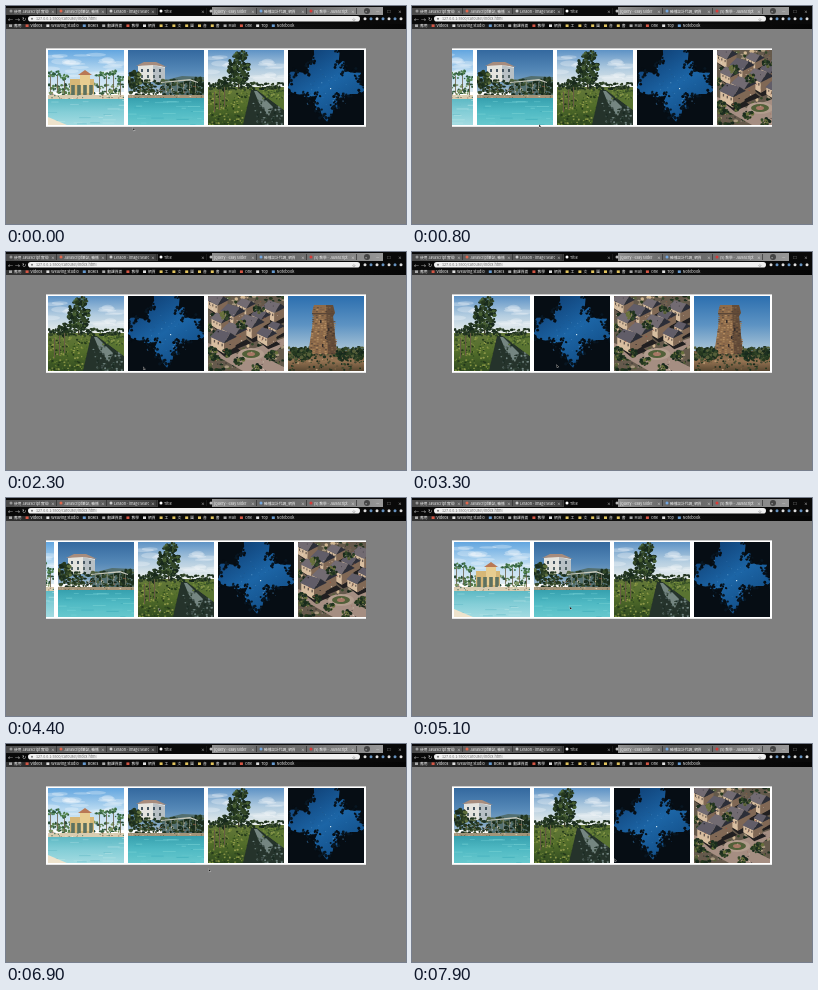
These frames come from a looping animation (400 px wide and 218 px high, 8000 ms). An HTML page with a canvas:

```html
<!DOCTYPE html>
<html lang="zh">
<head>
<meta charset="utf-8">
<style>
html, body { margin: 0; width: 100%; height: 100%; overflow: hidden; background: #808080 }
canvas { display: block; width: 400px; height: 218px }
</style>
</head>
<body>
<canvas id="stage" width="400" height="218"></canvas>
<script>
const W = 76, H = 75, SLOT = 80, LOOP = 8000;
const stage = document.getElementById('stage').getContext('2d');
let g, seed;

const rnd = (a = 0, b = 1) => {
  seed = (seed * 16807) % 2147483647;
  return a + (b - a) * seed / 2147483647;
};
const pick = list => list[Math.floor(rnd(0, list.length))];

function layer(w, h, draw) {
  const c = document.createElement('canvas');
  c.width = w;
  c.height = h;
  g = c.getContext('2d');
  seed = 4711;
  draw();
  return c;
}
function rect(color, x, y, w, h) {
  g.fillStyle = color;
  g.fillRect(x, y, w, h);
}
function poly(color, ...p) {
  g.fillStyle = color;
  g.beginPath();
  for (let i = 0; i < p.length; i += 2) g.lineTo(p[i], p[i + 1]);
  g.fill();
}
function oval(color, x, y, rx, ry = rx) {
  g.fillStyle = color;
  g.beginPath();
  g.ellipse(x, y, rx, ry, 0, 0, 7);
  g.fill();
}
function gradient(x, y, dx, dy, ...colors) {
  const f = g.createLinearGradient(x, y, x + dx, y + dy);
  colors.forEach((c, i) => f.addColorStop(i / (colors.length - 1), c));
  return f;
}
const fade = (y, h, ...colors) => rect(gradient(0, y, 0, h, ...colors), 0, y, W, h);

// Scatter small flecks over a box.
function flecks(n, x, y, w, h, size, ...colors) {
  while (n--) oval(pick(colors), x + rnd(0, w), y + rnd(0, h), rnd(.4, 1) * size, rnd(.3, .8) * size);
}
// Scatter leaves inside an ellipse.
function crown(n, x, y, rx, ry, size, ...colors) {
  while (n--) {
    const a = rnd(0, 6.3), r = Math.sqrt(rnd());
    oval(pick(colors), x + rx * r * Math.cos(a), y + ry * r * Math.sin(a), rnd(.5, 1) * size);
  }
}
function clouds(n, y, h) {
  while (n--) oval('rgba(255,255,255,.28)', rnd(0, W), y + rnd(0, h), rnd(4, 12), rnd(1, 3));
}
function ripples(y, ...colors) {
  for (let i = 0; i < 28; i++) rect(pick(colors), rnd(-5, W), rnd(y, H), rnd(3, 14), .6);
}
const DARK = ['#18291c', '#25381f', '#34482a', '#1d3020'];

function city() {
  fade(0, 38, '#3d74aa', '#7d9fbd', '#d6b8a2');
  fade(36, 39, '#66544d', '#4b342d', '#2b2323');
  flecks(60, 0, 33, W, 5, 1.6, '#40444d', '#665755', '#b3907c');
  for (let y = 37; y < 73; y += .5) {
    const s = y / 20;
    rect(pick(['#75483a', '#94664f', '#382c2e', '#54423d', '#24232a', '#b18665']), rnd(-2, W), y, rnd(1, 3) * s, rnd(.5, 1.4) * s);
  }
  poly('#cbc4bb', 17, 37, 18.7, 25, 20, 37);
  poly('#72473a', 25, H, 29, 53, 48, 51, 52, H);
  flecks(35, 27, 54, 40, 18, .8, '#e0a56d', '#241f24', '#a06c4f');
}
function pool() {
  fade(0, 42, '#62a5df', '#b7d9f1', '#e0edf4');
  clouds(25, 4, 22);
  flecks(120, 0, 34, W, 11, 2, '#355c3d', '#567d4b', '#7d9563', '#294c39');
  rect('#d7b777', 22, 29, 24, 18);
  rect('#e8cd91', 32, 24, 10, 19);
  poly('#b97855', 30, 25, 37, 20, 44, 25);
  for (let x = 25; x < 46; x += 6) rect('#5d7160', x - 1.8, 35, 3.6, 10);
  for (let x = 2; x < W; x += 7) {
    if (x > 20 && x < 48) continue;
    const y = rnd(23, 29);
    rect('#6a6048', x, y, .8, 18);
    crown(14, x, y, 4.5, 3, 1.3, '#3f7045', '#588a50', '#2e5940');
  }
  rect('#d9ccb0', 0, 45, W, 5);
  flecks(35, 0, 44, W, 5, 1.1, '#f2e7d2', '#967e65', '#557a65');
  fade(49, 26, '#5eb9c4', '#84ced7', '#a3dbe1');
  ripples(50, '#b3e2e5', '#69bdc9', '#96d5dc');
  poly('#eee3cc', 0, 67, 19, H, 0, H);
}
function house() {
  fade(0, 42, '#34699f', '#5588b7', '#94b3ca');
  poly('#536f70', 34, 31, 54, 26, W, 27, W, 45, 34, 45);
  poly('#e4e4df', 10, 32, 10, 16, 22, 13, 37, 17, 37, 32);
  poly('#b8c0c5', 25, 15, 37, 18, 37, 32, 25, 32);
  poly('#a78c7d', 8, 16, 16, 12, 28, 12, 39, 17, 25, 15);
  for (let x = 13; x < 36; x += 6) {
    rect('#465662', x, 19, 2, 3);
    rect('#536365', x, 25, 2, 3);
  }
  flecks(190, 0, 30, W, 15, 2.1, ...DARK, '#526340');
  crown(55, 6, 31, 8, 10, 2, ...DARK, '#5d6e3c');
  crown(50, 69, 36, 9, 9, 2, ...DARK);
  poly('#c7c9bd', 33, 32, 62, 29, 70, 32, 70, 33, 62, 30.5, 33, 33);
  for (let x = 37; x < 70; x += 6) rect('#8b907f', x, 32, .6, 11);
  flecks(28, 8, 35, 60, 8, .8, '#e5c9a5', '#a96b51', '#d5dad1');
  rect('#a39479', 0, 45, W, 3);
  flecks(30, 0, 44, W, 4, .8, '#e3d4b7', '#515d44');
  fade(48, 27, '#36a0ae', '#50bac4', '#67c8cd');
  ripples(49, '#75d0d4', '#3eacba', '#62c4cc');
}
function river() {
  fade(0, 38, '#5d92c5', '#b2cce0', '#edf0ec');
  clouds(20, 5, 25);
  fade(37, 38, '#64783a', '#526d2a', '#304a20');
  flecks(130, 0, 33, W, 7, 2, ...DARK);
  flecks(190, 0, 40, 43, 35, 1.4, '#778b39', '#4e6927', '#304b20', '#8e9949', '#24391b');
  poly('#25332b', 43, 40, 49, 40, W, 60, W, H, 35, H);
  poly('#758681', 46, 41, 49, 41, 65, 57, 61, 66, 51, 53);
  flecks(75, 45, 49, 29, 26, 1.5, '#42524d', '#1b2c24', '#718480', '#2e4034');
  poly('#597331', 49, 40, W, 40, W, 60);
  flecks(75, 55, 40, 21, 9, 1.2, '#70883b', '#344d27', '#8a994d');
  rect('#40402b', 30, 25, 1.4, 14);
  crown(190, 31, 19, 11, 15, 1.9, ...DARK, '#465e32');
  crown(45, 33, 5, 7, 5, 1.5, ...DARK, '#496239');
  crown(40, 17, 32, 7, 5, 1.7, ...DARK);
  for (let x = 6; x < 18; x += 5) rect('#675d43', x, 45 - x / 2, 1.1, 20);
}
function night() {
  rect('#060d14', 0, 0, W, H);
  // The sky is a four-armed gap with a ragged edge of treetops.
  const edge = [];
  for (let a = 0; a < 6.28; a += .07) {
    const r = 29 + 9 * Math.cos(4 * a) - 5 * Math.sin(a) + 3 * Math.sin(13 * a) + rnd(-3, 3);
    edge.push(38 + r * Math.cos(a), 35 + r * Math.sin(a));
  }
  poly(gradient(10, 0, 50, H, '#0e3c70', '#1c65a6', '#10477d'), ...edge);
  for (let i = 0; i < edge.length; i += 6) crown(7, edge[i], edge[i + 1], 4, 4, 1.6, '#060d14', '#081622');
  flecks(45, 18, 15, 42, 40, .7, '#3d82bb', '#5d99cb', '#1e588d');
  rect('#c4dfef', 42, 38, 1.2, 1.2);
}
function building(x, y, s) {
  g.save();
  g.translate(x, y);
  g.scale(s, s);
  poly('#211f20', -9, 6, 1, 12, 10, 7, 14, 10, 2, 15);
  poly('#d8bea0', -9, -1, 1, 4, 1, 12, -9, 6);
  poly('#806855', 1, 4, 10, -1, 10, 7, 1, 12);
  poly(pick(['#615d68', '#726b72', '#4d4b54']), -10, -1, -4, -7, 6, -4, 1, 4);
  poly('#2c2e38', 1, 4, 6, -4, 11, -1);
  for (let i = -7; i < 0; i += 3) rect('#5e5149', i, 5 + i / 2, 1, 2);
  g.restore();
}
function village() {
  rect('#655a4c', 0, 0, W, H);
  flecks(280, 0, 0, W, H, 2.6, ...DARK, '#59613a', '#a7977d', '#716252', '#d0b691');
  poly('#a58e82', 0, 47, 30, 58, W, 42, W, 49, 58, 62, W, 71, W, H, 35, H, 0, 55);
  for (let i = 0; i < 11; i++) building(8 + i * 29 % 71 + rnd(-3, 3), 5 + i * 3.7, rnd(.8, 1.3));
  oval('#b39d8e', 43, 58, 13, 6);
  oval('#526039', 43, 58, 9, 4);
  oval('#a77865', 43, 58, 4, 2);
  for (let i = 0; i < 11; i++) crown(19, i * 31 % W, i % 3 ? rnd(49, 73) : rnd(5, 38), 5, 4, 1.9, ...DARK, '#68713c');
  flecks(75, 0, 0, W, H, .8, '#e3d5c1', '#242326', '#9e5743');
}
function tower() {
  fade(0, 58, '#2c6faf', '#5d93c3', '#b4cbd9');
  fade(55, 20, '#725c42', '#957352', '#594832');
  flecks(130, 0, 51, W, 10, 2, ...DARK, '#566139');
  poly('#8f6b49', 24, 16, 26, 9, 45, 9, 47, 17, 45, 20, 49, 58, 20, 58, 26, 20);
  for (let y = 11; y < 58; y += 2) {
    const half = 9 + y / 12;
    for (let x = 35 - half; x < 34 + half; x += 3) rect(pick(['#b18a60', '#806047', '#65503f', '#a07d57', '#896a4d']), x + rnd(0, 1), y, 2, 1.3);
  }
  poly('rgba(38,30,30,.4)', 38, 9, 45, 9, 47, 17, 45, 20, 49, 58, 40, 58);
  rect('#5a4637', 24, 17, 22, 1.4);
  for (let y = 24; y < 50; y += 8) rect('#332c2a', 30 + y % 11, y, 1.5, 3);
  for (const x of [5, 17, 55, 69]) crown(48, x, 58, 7, 6, 2, ...DARK, '#565f39');
  flecks(80, 0, 62, W, 12, 1.4, '#796344', '#454832', '#b49670', ...DARK);
}

function label(s, x, y, color = '#ddd', size = 3.8) {
  g.font = size + 'px "Noto Sans CJK TC", "Noto Sans CJK SC", "Noto Sans", sans-serif';
  g.fillStyle = color;
  g.fillText(s, x, y);
}
function browser() {
  rect('#090909', 0, 0, 400, 23);
  rect(gradient(0, 0, 152, 0, '#494949', '#696969', '#3d3d3d'), 0, 2, 152, 7);
  rect(gradient(204, 0, 174, 0, '#929292', '#606060', '#777', '#999'), 206, 1, 171, 8);
  const tabs = ['使用 JavaScript 實現輪播', 'JavaScript筆記, 輪播效果', 'Lesson - image search', 'Title', 'jQuery - easy slider', '輪播設計代碼_網頁', '(5) 教學 - JavaScript'];
  tabs.forEach((s, i) => {
    const x = 3 + i * 50;
    oval(['#999', '#df664c', '#ccc', '#fff', '#bbb', '#73a6df', '#d63b38'][i], x + 2, 5, 1.5);
    g.save();
    g.beginPath();
    g.rect(x, 0, 40, 9);
    g.clip();
    label(s, x + 5, 6.5, '#eee', 3.7);
    g.restore();
    label('×', x + 42, 6.5, '#eee');
    rect('#252525', x + 47, 2, .6, 6);
  });
  oval('#444', 361, 5, 3);
  [...'+—□×'].forEach((s, i) => label(s, 359 + i * 11, 6.5, '#eee'));
  g.fillStyle = '#f1f1f1';
  g.beginPath();
  g.roundRect(22, 10, 332, 5.6, 2.8);
  g.fill();
  [...'←→↻'].forEach((s, i) => label(s, 2 + i * 7, 14.5, '#ddd', 5));
  oval('#777', 26, 12.8, 1);
  label('127.0.0.1:5500/carousel/index.html', 30, 14.3, '#666', 3.7);
  label('☆', 346, 14.5, '#555');
  for (let x = 359; x < 400; x += 6) oval(x % 4 == 1 ? '#6692c0' : '#ddd', x, 12.8, 1.5);
  rect(gradient(0, 0, 400, 0, '#333', '#080808', '#111', '#050505'), 0, 18, 400, 5);
  const bookmarks = ['應用', 'Videos', 'Weaving Studio', 'Boxes', '翻譯頁面', '教學', '網頁', ...'工文圖音書', 'Mail', 'One', 'Top', 'Notebook'];
  let x = 3;
  bookmarks.forEach((s, i) => {
    rect(s.length == 1 ? '#e2c45e' : ['#aaa', '#d65745', '#ddd', '#679bd1'][i % 4], x, 18.4, 3, 2.6);
    label(s, x + 5, 21.3, '#eee');
    x += g.measureText(s).width + 9;
  });
}

const photos = [city, pool, house, river, night, village, tower].map(draw => layer(W, H, draw));
const chrome = layer(400, 23, browser);

// The slider takes one step per beat and rests for one beat at the right end.
const stops = [1, 2, 3, 3, 2, 1, 0, 1, 2];
const BEAT = 980, FIRST = 410, MOVE = 550;
function scrollAt(t) {
  const n = Math.max(0, (t - FIRST) / BEAT), i = Math.floor(n);
  const p = Math.min(1, (n - i) * BEAT / MOVE);
  return SLOT * (stops[i] + (stops[i + 1] - stops[i]) * p);
}
const path = [[0, 127, 122], [900, 127, 118], [5400, 160, 108], [5900, 178, 98], [6300, 198, 123], [7200, 205, 126], [LOOP, 202, 113]];
function cursorAt(t) {
  const i = path.findIndex(p => p[0] > t), [a, x, y] = path[i - 1], [b, u, v] = path[i], k = (t - a) / (b - a);
  return [x + (u - x) * k, y + (v - y) * k];
}

const start = performance.now();
function frame() {
  const t = Math.floor(((performance.now() - start) % LOOP) / 100) * 100;
  g = stage;
  rect('#808080', 0, 0, 400, 218);
  g.drawImage(chrome, 0, 0);
  rect('#fff', 40, 42.4, 320, 78.4);
  g.save();
  g.beginPath();
  g.rect(40, 42, 320, 79);
  g.clip();
  photos.forEach((photo, i) => g.drawImage(photo, 42 + i * SLOT - Math.round(scrollAt(t)), 44));
  g.restore();
  const [x, y] = cursorAt(t);
  poly('#ddd', x - .3, y - .5, x + 2.5, y + 2.3, x + .2, y + 3.2);
  poly('#111', x, y, x + 2, y + 2, x + .3, y + 2.5);
  requestAnimationFrame(frame);
}
frame();
</script>
</body>
</html>
```
